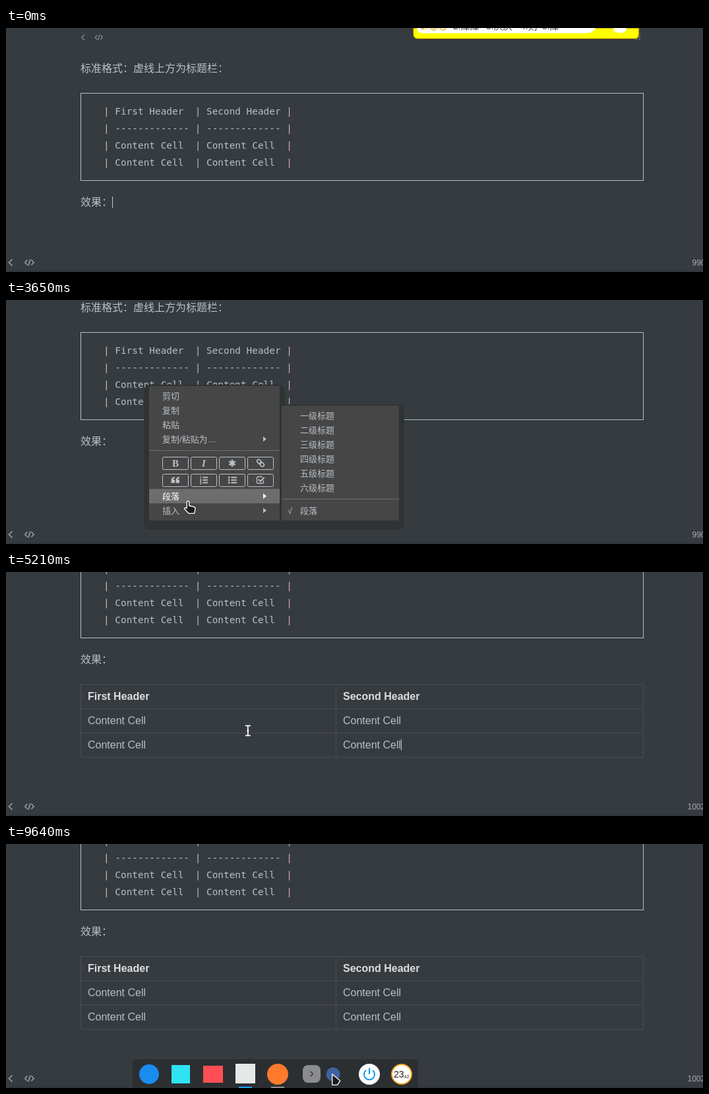
Write an HTML page that moves like this. It is 1057x372 px and loops after 9.74 s.

```html
<!DOCTYPE html>
<html lang="zh-CN">
<head>
<meta charset="utf-8">
<title>Markdown table</title>
<style>
  html, body { margin: 0; width: 100%; height: 100%; overflow: hidden; background: #363b40; }
  svg { display: block; }
  text { font: 13px "Liberation Sans", "Noto Sans CJK SC", sans-serif; fill: #b8bfc6; white-space: pre; }
  .body { font-size: 16px; }
  .head { font-size: 16px; font-weight: bold; fill: #dedede; }
  .code { font: 14.4px "DejaVu Sans Mono", monospace; }
  .code .p0 { fill: #c6bea6; }
  .code .p1 { fill: #9dc0d4; }
  .code .p2 { fill: #d3a9bd; }
  .serif { font: bold 15px "Liberation Serif", serif; text-anchor: middle; }
  .count { font-size: 12px; fill: #a2a8ae; }
  .line { fill: none; stroke: #b8bfc6; }
  .shadow { fill: #2f3334; }
  .panel { fill: #464646; }
  .sep { fill: #6e6e6e; }
  .hot text { fill: #fff; }
  .caret { fill: #c4cad0; }
  .hand, .arrow { fill: #1b1c1d; stroke: #fff; stroke-width: 1.3; stroke-linejoin: round; }
</style>
</head>
<body>
<svg width="1057" height="372" viewBox="0 0 1057 372">
  <defs>
    <g id="nav" fill="none" stroke="#a9b0b6" stroke-width="1.3">
      <path d="M9.5 352.5L4.5 357.5 9.5 362.5"/>
      <path d="M32.5 353.5L28.8 357.5 32.5 361.5M38.5 353.5L42.2 357.5 38.5 361.5M37 352.5L34 362.5"/>
    </g>
    <path id="more" d="M390 -4L395 0 390 4Z"/>
  </defs>

  <g id="page">
    <use href="#nav" transform="translate(111 -286) scale(.84)" opacity=".8"/>
    <text x="953" y="17" font-size="10" style="font-size:10px" opacity=".65">页</text>
    <text class="body" x="113" y="67">标准格式：虚线上方为标题栏：</text>
    <rect class="line" x="113.5" y="99.5" width="853" height="133"/>
    <g id="code"></g>
    <text class="body" x="113" y="271">效果：</text>
    <g data-on="5070-9740">
      <path d="M113.5 303.5H966.5V414.5H113.5ZM113.5 340.5H966.5M113.5 377.5H966.5M500.5 303.5V414.5" fill="none" stroke="#474d54"/>
      <text class="head" x="124" y="327">First Header</text>
      <text class="head" x="511" y="327">Second Header</text>
      <g id="cells"></g>
    </g>
  </g>

  <rect class="caret" x="161" y="257" width="1" height="17" data-on="0-380"/>
  <rect class="caret" x="113" y="258" width="1" height="17" data-on="620-1090 1640-2140 2640-3250 3750-4250 4700-5070"/>
  <rect class="caret" x="599" y="255" width="1" height="17" data-on="5070-5630 6130-6610 7090-7600 8040-8540 9040-9540"/>

  <rect y="370" width="1057" height="2" fill="#31363a"/>
  <use href="#nav"/>
  <text class="count" x="1040.500" y="362" data-on="0-5070">990 词</text>
  <text class="count" x="1033.500" y="362" data-on="5070-9740">1002 词</text>

  <g data-on="0-40">
    <path d="M617.500 0V9Q617.500 16.500 625 16.500H953Q960 16.500 960 9V0Z" fill="#ff0" stroke="#8a5a10"/>
    <path d="M623 0Q624 8 632 8H880Q890 8 894 0Z" fill="#fff"/>
    <text id="words" y="2" style="font-size:14px"></text>
    <ellipse cx="931" cy="2" rx="10" ry="5.500" fill="#fff"/>
  </g>

  <g data-on="2780-4990">
    <rect class="shadow" x="209" y="129" width="214" height="221" rx="9"/>
    <g data-on="3450-4080">
      <rect class="shadow" x="410" y="159" width="194" height="191" rx="9"/>
      <rect class="panel" x="418" y="161" width="178" height="175" rx="2"/>
      <g id="levels"></g>
      <rect class="sep" x="418" y="303" width="178" height="1"/>
      <text x="427" y="326">√</text>
      <text x="446" y="326">段落</text>
    </g>
    <g data-on="4160-4990">
      <rect class="shadow" x="410" y="172" width="194" height="67" rx="9"/>
      <rect class="panel" x="418" y="174" width="178" height="52" rx="2"/>
      <rect x="418" y="200" width="178" height="22" fill="#4a525b" data-on="4640-4990"/>
      <text x="438" y="193">复制为Markdown</text>
      <text x="438" y="215">粘贴为纯文本</text>
    </g>
    <rect class="panel" x="217" y="131" width="198" height="205" rx="2"/>
    <g id="menu"></g>
    <rect class="sep" x="217" y="229" width="198" height="1"/>
    <g id="buttons"></g>
    <text class="serif" x="257" y="254">B</text>
    <text class="serif" x="300" y="254" font-style="italic" style="font-style:italic">I</text>
    <g class="line" stroke-width="3">
      <path d="M343 243.500V254M338.500 246.100L347.500 251.400M338.500 251.400L347.500 246.100" stroke-width="2.800"/>
      <g transform="rotate(45 386 248.500)" stroke-width="1.600">
        <rect x="379.500" y="246" width="7" height="5" rx="2.500"/>
        <rect x="385.500" y="246" width="7" height="5" rx="2.500"/>
      </g>
      <path d="M298.500 270.500H306M298.500 274.500H306M298.500 278.500H306M341.500 270.500H350M341.500 274.500H350M341.500 278.500H350" stroke-width="2"/>
      <path d="M337 270.500H339.500M337 274.500H339.500M337 278.500H339.500" stroke-width="2.500"/>
      <path d="M295.500 268.500V272M294 273.500H296V275H294.500V276.500H296.500M294 278H296V280.500H294" stroke-width="1"/>
      <path d="M389 269.500H382.500Q380.500 269.500 380.500 271.500V277.500Q380.500 279.500 382.500 279.500H388.500Q390.500 279.500 390.500 277.500V275" stroke-width="1.400"/>
      <path d="M383 273.500L386 276.500 391.500 270.500" stroke-width="2"/>
    </g>
    <path d="M256 269.500Q250.500 270 250.500 275V279H256V274H253.500Q253.500 271.700 256 271.500ZM263 269.500Q257.500 270 257.500 275V279H263V274H260.500Q260.500 271.700 263 271.500Z" fill="#b8bfc6"/>
    <g class="hot" data-on="3370-3980">
      <rect x="217" y="288" width="198" height="22" fill="#6d6d6f"/>
      <text x="237" y="304">段落</text>
      <use href="#more" y="299" fill="#fff"/>
    </g>
    <g class="hot" data-on="4120-4990">
      <rect x="217" y="201" width="198" height="22" fill="#6d6d6f"/>
      <text x="237" y="217">复制/粘贴为…</text>
      <use href="#more" y="212" fill="#fff"/>
    </g>
  </g>

  <g id="dock">
    <path d="M192 372V333Q192 328 197 328H620Q625 328 625 333V372Z" fill="#2c2f31"/>
    <circle cx="217" cy="351" r="15" fill="#1a8cf0"/>
    <rect x="251" y="337" width="28" height="28" fill="#2fe3f2"/>
    <rect x="299" y="338" width="30" height="26" fill="#ff4f55"/>
    <rect x="348" y="335" width="30" height="30" fill="#e6e8e8"/>
    <circle cx="412" cy="351" r="16" fill="#ff7a2c"/>
    <rect x="353" y="370" width="20" height="2" fill="#1c9df0"/>
    <rect x="402" y="370" width="20" height="2" fill="#8d9092"/>
    <rect x="450" y="337" width="27" height="27" rx="8" fill="#8b8c91"/>
    <path d="M461.500 346.500L465.500 350.500 461.500 354.500" fill="none" stroke="#333" stroke-width="1.300"/>
    <circle cx="500.500" cy="352" r="7" fill="#f47a26" data-on="0-9010"/>
    <circle cx="496" cy="351" r="10.500" fill="#3f62a0" data-on="9010-9740"/>
    <circle cx="551" cy="351" r="16" fill="#fff"/>
    <path d="M546 345A8 8 0 1 0 556 345M551 341.500V351" fill="none" stroke="#1a9cf5" stroke-width="2.200"/>
    <circle cx="600" cy="351" r="15" fill="#fff" stroke="#f3a41d" stroke-width="2"/>
    <text x="588" y="356" style="font-size:14px;fill:#222">23</text>
    <text x="603.500" y="357" style="font-size:7px;fill:#222">42</text>
  </g>

  <g id="pointer">
    <path class="arrow" d="M.7.7V17.300H8.500L12.800 10.900Z" data-on="2780-3300 7500-9740"/>
    <path class="hand" d="M-1.700 1.800Q0-.8 1.700 1.800V7.500L9 9.300Q11.700 10.300 11 13L9.500 19.300H1L-5.500 12.300Q-5 9.500-1.700 11.500Z" data-on="3300-4990"/>
    <path d="M-4-7.500H4M-4 7.500H4M0-7.500V7.500M-1.500 0H1.500" fill="none" stroke="#fff" stroke-width="1.800" data-on="4990-7500"/>
  </g>
</svg>
<script>
const LOOP = 9740;
const $ = id => document.getElementById(id);
const fill = (id, list, draw) => { $(id).innerHTML = list.map(draw).join(''); };

const cell = 'Content Cell ';
const rows = [['First Header ', 'Second Header'], ['-'.repeat(13), '-'.repeat(13)], [cell, cell], [cell, cell]];
const pipe = i => `<tspan class="p${i}">|</tspan>`;
fill('code', rows, ([a, b], i) =>
  `<text class="code" x="148" y="${132 + 26 * i}">${pipe(0)} ${a} ${pipe(1)} ${b} ${pipe(2)}</text>`);
fill('cells', [0, 1, 2, 3], i =>
  `<text class="body" x="${i % 2 ? 511 : 124}" y="${i < 2 ? 364 : 401}">Content Cell</text>`);
fill('words', [['1.嗯嗯', 628], ['2.库库', 678], ['3.厌厌', 728], ['4.则', 780], ['5.库', 813]], ([s, x], i) =>
  `<tspan x="${x}" style="fill:${i ? '#444' : '#d8a400'}">${s}</tspan>`);
fill('levels', [...'一二三四五六'], (n, i) => `<text x="446" y="${181 + 22 * i}">${n}级标题</text>`);
fill('menu', [['剪切', 146], ['复制', 168], ['粘贴', 190], ['复制/粘贴为…', 212, 1], ['段落', 299, 1], ['插入', 321, 1]],
  ([s, y, more]) => `<text x="237" y="${y + 5}">${s}</text>` +
    (more ? `<use href="#more" y="${y}" fill="#b8bfc6"/>` : ''));
fill('buttons', [...Array(8).keys()], i =>
  `<rect class="line" x="${237.5 + 43 * (i % 4)}" y="${i < 4 ? 239.5 : 265.5}" width="39" height="19" rx="2"/>`);

// Pointer stops: time, x, y
const path = [
  [2780, 214, 262], [2920, 206, 267], [3110, 204, 272], [3250, 204, 272], [3450, 250, 297],
  [3650, 276, 306], [3900, 277, 304], [4130, 264, 213], [4200, 264, 209], [4240, 264, 209],
  [4730, 440, 209], [4850, 443, 211], [4990, 443, 211], [5330, 337, 254], [5940, 337, 254],
  [6350, 482, 245], [7120, 482, 245], [7440, 489, 364], [7560, 490, 364], [7790, 491, 347],
  [8410, 491, 347], [8800, 466, 348], [9010, 466, 348], [9640, 494, 350], [LOOP, 494, 350]
];
const ease = u => u * u * (3 - 2 * u);
const ramp = (t, a, b) => Math.min(1, Math.max(0, (t - a) / (b - a)));

const timed = [...document.querySelectorAll('[data-on]')].map(el =>
  [el, el.dataset.on.split(' ').map(s => s.split('-').map(Number))]);
const move = (id, x, y) => $(id).setAttribute('transform', `translate(${x} ${y})`);
const show = (el, on) => { el.style.display = on ? '' : 'none'; };

function draw(t) {
  for (const [el, spans] of timed) show(el, spans.some(([a, b]) => t >= a && t < b));
  move('page', 0, t < 620 ? 0 : t < 5070 ? -50 : -132);
  move('dock', 0, 44 * (1 - ease(ramp(t, 7380, 7700))));
  show($('dock'), t > 7380);

  const i = Math.max(1, path.findIndex(p => p[0] > t));
  const [a, x0, y0] = path[i - 1], [b, x1, y1] = path[i];
  const u = ease(ramp(t, a, b));
  move('pointer', x0 + (x1 - x0) * u, y0 + (y1 - y0) * u);
}

const start = performance.now();
function tick() {
  draw((performance.now() - start) % LOOP);
  requestAnimationFrame(tick);
}
tick();
</script>
</body>
</html>
```
